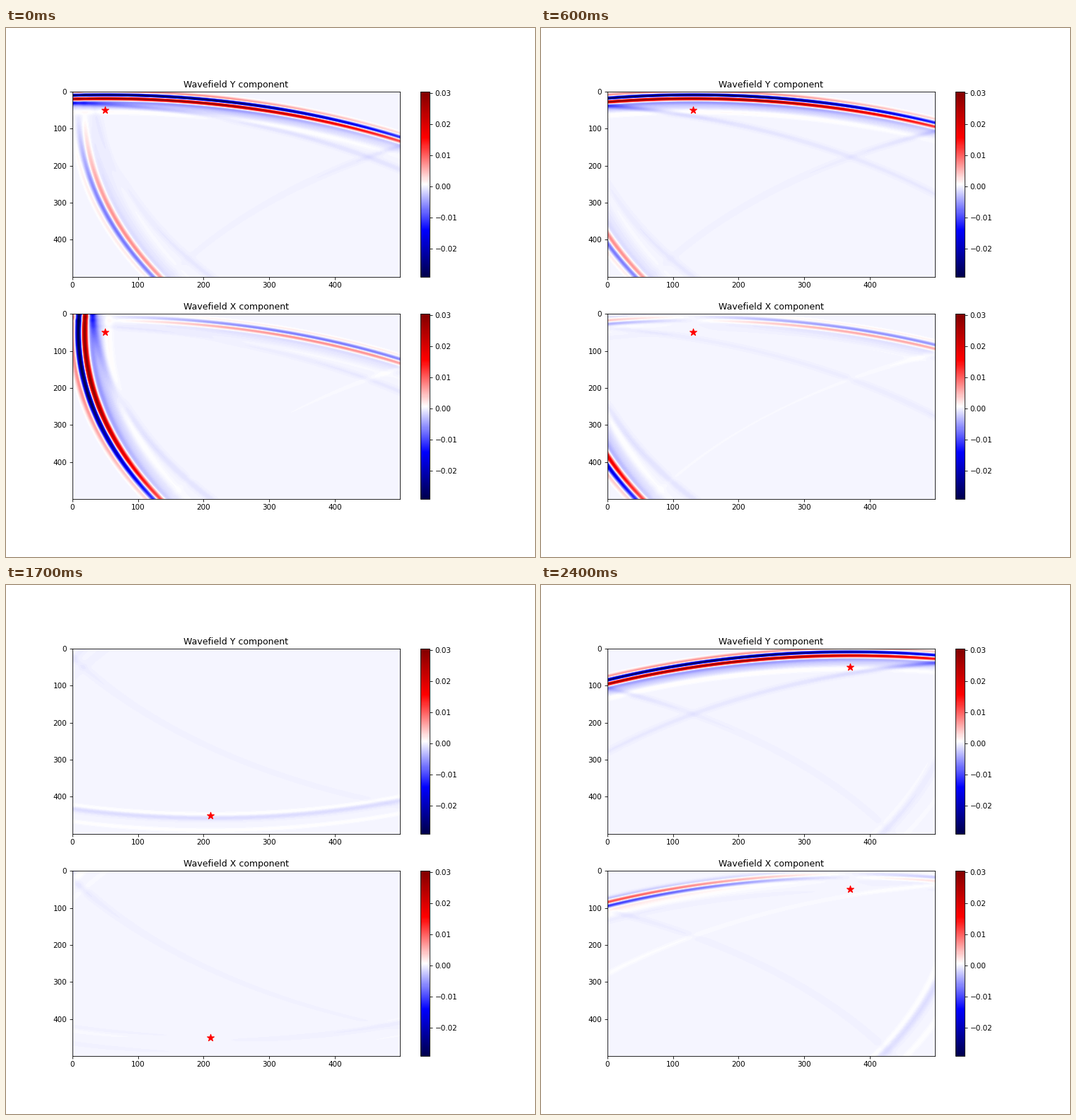
A matplotlib script for the animation above (2500 ms loop, 748 px wide and 748 px high).

```python
import numpy as np
import matplotlib.pyplot as plt
from matplotlib.animation import FuncAnimation

N = 500          # grid size; strong reflections come from the walls at N
FRONT = 941.5    # distance travelled by the wave
STEPS = range(50, 451, 80)
SHOTS = [(x, y) for x in STEPS for y in STEPS][:25]

yy, xx = np.mgrid[0:N, 0:N].astype(float)

# Pulses as sums of bumps: (amplitude, lag behind the front, width)
STRONG = [(0.0082, -8.5, 3.5), (-0.0305, 0, 3.4), (0.0300, 9.3, 3.4),
          (-0.0045, 19, 4.2), (-0.0022, 28, 7), (0.0010, 45, 5)]
WEAK = [(0.0007, 2, 4), (-0.0014, 35, 5), (0.0008, 45, 4)]
TRAIL = [(-1, 20, 4.5)]


def front(cx, cy, pulse, gain=1.0):
    """Y and X parts of a circular wave around a mirrored shot."""
    dx, dy = xx - cx, yy - cy
    r = np.hypot(dx, dy)
    lag = FRONT - r
    wave = gain * sum(a * np.exp(-((lag - u) / w) ** 2 / 2) for a, u, w in pulse)
    return np.array([dy, dx]) * wave / r


def fade(p, s):
    """Loss along a strong front towards the far wall."""
    t = np.clip((p - 230) / 270, 0, 1)
    return 1 - t * (0.4 + 0.15 * np.clip((p - s) / 450, 0, 1))


def graze(p, s):
    """Second bounce at a side wall: p from the grid point, s from the shot."""
    return (0.0014 + 0.010 * np.exp(-p / 65)) * np.exp(-s / 220)


def wavefield(sx, sy):
    mx, my = 2 * N - sx, 2 * N - sy
    upward = (front(sx, my, STRONG, fade(xx, sx))
              + front(-sx, my, TRAIL, graze(xx, sx))
              + front(mx, my, TRAIL, graze(N - xx, N - sx)))
    leftward = (front(mx, sy, STRONG, fade(yy, sy))
                + front(mx, -sy, TRAIL, graze(yy, sy)))
    flip = np.array([-1, 1])[:, None, None]
    return (flip * (upward - leftward)
            + front(-sx, sy, WEAK) + front(sx, -sy, WEAK))


fig, axes = plt.subplots(2, 1, figsize=(10, 10), dpi=74.8)
images, stars = [], []
for ax, name in zip(axes, "YX"):
    im = ax.imshow(np.zeros((N, N)), cmap="seismic", vmin=-0.0291, vmax=0.0304,
                   aspect="auto")
    fig.colorbar(im, ax=ax)
    ax.set_title(f"Wavefield {name} component")
    images.append(im)
    stars.append(ax.scatter(*SHOTS[0], s=100, c="red", marker="*"))


def update(i):
    for im, star, data in zip(images, stars, wavefield(*SHOTS[i])):
        im.set_data(data)
        star.set_offsets([SHOTS[i]])
    return images + stars


anim = FuncAnimation(fig, update, frames=len(SHOTS), interval=100,
                     repeat=True, repeat_delay=0)
plt.show()
```
